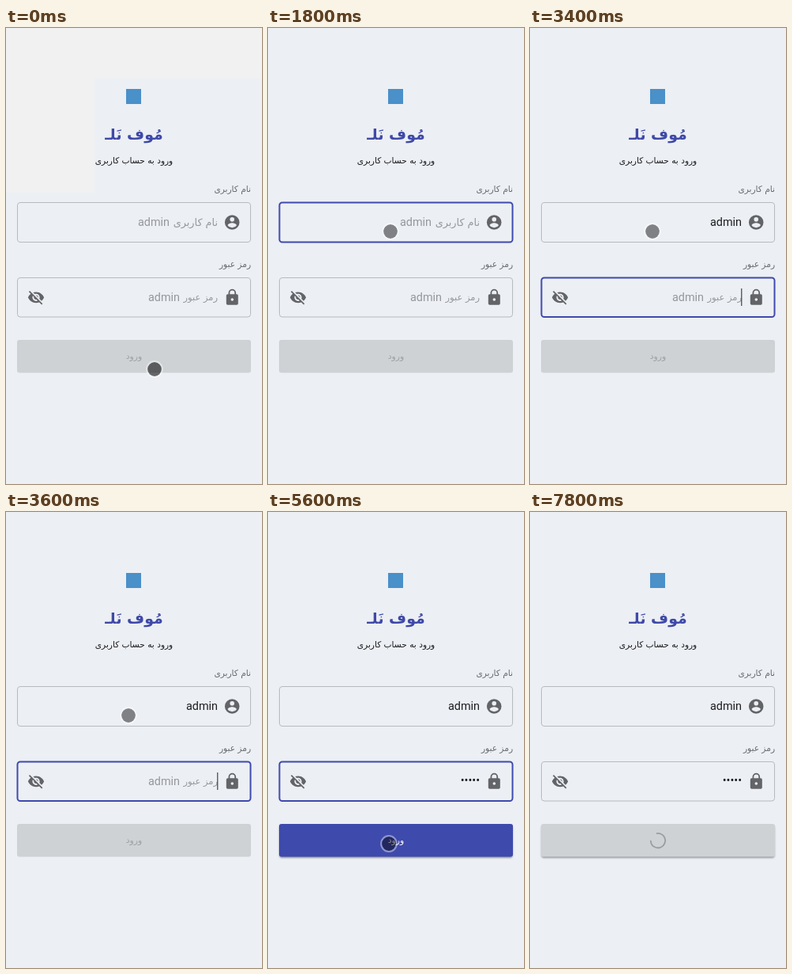
Animation, 324 px wide and 576 px high, one loop 8 s. Source, as an HTML page:

```html
<!DOCTYPE html>
<html lang="fa">
<head>
<meta charset="utf-8">
<title>ورود</title>
<style>
html, body { margin: 0; width: 100%; height: 100%; overflow: hidden; background: #eceff4; }
svg { display: block; width: 324px; height: 576px; }
text { font-family: "DejaVu Sans", sans-serif; white-space: pre; }
.fa { direction: rtl; }
.en { font: 14.4px Roboto, sans-serif; text-anchor: end; }
.mid { text-anchor: middle; }
.label { font-size: 10.6px; fill: #66686d; }
.hint { fill: #95979b; }
.value { fill: #1c1d20; }
.field { fill: none; stroke: #b7babf; }
.icon { fill: #626468; }
.hole { fill: #eceff4; }
.caret { stroke: #222; stroke-width: 1; }
</style>
</head>
<body>
<svg viewBox="0 0 324 576">
  <defs>
    <filter id="soft" x="-10%" y="-30%" width="120%" height="180%">
      <feGaussianBlur stdDeviation="1.3"/>
    </filter>
  </defs>
  <rect width="324" height="576" fill="#eceff4"/>
  <path id="veil" d="M0 0H324V64H112V208H0Z" fill="#f1f1f1"/>

  <rect x="152" y="77" width="19" height="19" fill="#4a90c9"/>
  <text class="fa mid" x="162" y="141" font-size="19" font-weight="700" fill="#3f49a8">مُوف نَلـ</text>
  <text class="fa mid" x="162" y="170.5" font-size="10.6" fill="#17181a">ورود به حساب کاربری</text>

  <text class="fa label" x="310" y="207">نام کاربری</text>
  <rect id="userBox" class="field" x="14.5" y="220.5" width="295" height="50" rx="3.5"/>
  <g id="userHint" class="hint">
    <text class="fa" x="268" y="249.5" font-size="12.8">نام کاربری</text>
    <text class="en" x="207" y="250">admin</text>
  </g>
  <text id="userText" class="en value" x="268" y="250"></text>
  <g class="icon">
    <circle cx="286.2" cy="245.5" r="9.3"/>
    <circle class="hole" cx="286.2" cy="241.8" r="2.8"/>
    <path class="hole" d="M280.6 249.2C280.6 247.3 284.3 246.3 286.2 246.3S291.8 247.3 291.8 249.2A6.8 6.8 0 0 1 280.6 249.2Z"/>
  </g>

  <text class="fa label" x="310" y="302">رمز عبور</text>
  <rect id="passBox" class="field" x="14.5" y="315.5" width="295" height="49.5" rx="3.5"/>
  <g id="passHint" class="hint">
    <text class="fa" x="268" y="344" font-size="11.5">رمز عبور</text>
    <text class="en" x="220" y="344.5">admin</text>
  </g>
  <text id="passText" class="en value" x="268" y="343.5"></text>
  <g class="icon">
    <rect x="278.8" y="336.2" width="15" height="13.6" rx="1.8"/>
    <path d="M282.4 337V334.6A3.9 3.9 0 0 1 290.2 334.6V337" fill="none" stroke="#626468" stroke-width="1.8"/>
    <circle class="hole" cx="286.3" cy="343" r="1.8"/>
    <path transform="translate(27 329.3) scale(.92)" d="M12 7c2.76 0 5 2.24 5 5 0 .65-.13 1.26-.36 1.83l2.92 2.92c1.51-1.26 2.7-2.89 3.43-4.75-1.73-4.39-6-7.5-11-7.5-1.4 0-2.74.25-3.98.7l2.16 2.16C10.74 7.13 11.35 7 12 7zM2 4.27l2.74 2.74C3.08 8.3 1.78 10.02 1 12c1.73 4.39 6 7.5 11 7.5 1.55 0 3.03-.3 4.38-.84L19.73 22 21 20.73 3.27 3zM7.53 9.8l1.55 1.55c-.05.21-.08.43-.08.65 0 1.66 1.34 3 3 3 .22 0 .44-.03.65-.08l1.55 1.55c-.67.33-1.41.53-2.2.53-2.76 0-5-2.24-5-5 0-.79.2-1.53.53-2.2zm4.31-.78l3.15 3.15.02-.16c0-1.66-1.34-3-3-3z"/>
  </g>
  <path id="caret" class="caret"/>

  <rect id="shade" x="14.5" y="396" width="295" height="41" rx="3" fill="#000" filter="url(#soft)"/>
  <rect id="button" x="14" y="394" width="296" height="41.5" rx="3"/>
  <text id="enter" class="fa mid" x="162" y="417.5" font-size="10.8">ورود</text>
  <circle id="spinner" cx="162" cy="415" r="9.2" fill="none" stroke="#9a9da0" stroke-width="1.8" pathLength="126.9"/>

  <g id="dot">
    <circle id="core" r="8.9"/>
    <circle r="9.9" fill="none" stroke="#fff" stroke-opacity=".42" stroke-width="2"/>
  </g>
</svg>
<script>
const LOOP = 8000, FOCUS_USER = 940, FOCUS_PASS = 3350, TYPE_PASS = 4400, CLICK = 5615;
const USER_KEYS = [[2600, 1], [2800, 3], [3000, 5]];
const PASS_KEYS = [[TYPE_PASS, 1], [4600, 3], [4800, 5]];
const CARET_ON = [[FOCUS_USER, 1470], [2000, 2530], [2600, FOCUS_PASS], [FOCUS_PASS, 3930], [TYPE_PASS, 5280]];
const BULLET = 4.9;

const el = id => document.getElementById(id);
const set = (id, attrs) => { for (const k in attrs) el(id).setAttribute(k, attrs[k]); };
const show = (id, on) => { el(id).style.display = on ? "" : "none"; };
const within = (t, a, b) => t >= a && t < b;
const ramp = (t, a, b) => Math.min(1, Math.max(0, (t - a) / (b - a)));
const ease = p => p * p * (3 - 2 * p);
const lerp = (a, b, p) => a + (b - a) * p;
const mix = (a, b, p) => `rgb(${a.map((v, i) => Math.round(lerp(v, b[i], p)))})`;
const typed = (keys, t) => keys.reduce((n, [at, count]) => t >= at ? count : n, 0);

function outline(id, focused) {
  el(id).style.stroke = focused ? "#3f4aad" : "";
  el(id).style.strokeWidth = focused ? 2 : 1;
}

function drawFields(t) {
  const u = typed(USER_KEYS, t), p = typed(PASS_KEYS, t);
  outline("userBox", within(t, FOCUS_USER, FOCUS_PASS));
  outline("passBox", within(t, FOCUS_PASS, CLICK));
  show("userHint", !u);
  show("passHint", !p);
  el("userText").textContent = "admin".slice(0, u);
  el("passText").textContent = "•".repeat(p);
  const inPass = t >= FOCUS_PASS;
  const x = inPass ? 267.8 - p * BULLET + (p ? 1 : 0) : 267.8;
  set("caret", { d: `M${x} ${inPass ? 329 : 234}v22` });
  show("caret", CARET_ON.some(([a, b]) => within(t, a, b)));
}

function drawButton(t) {
  const on = ramp(t, TYPE_PASS, TYPE_PASS + 250) * (1 - ramp(t, CLICK, CLICK + 250));
  set("button", { fill: mix([206, 210, 213], [63, 74, 173], on) });
  set("shade", { opacity: .37 * ramp(t, TYPE_PASS, TYPE_PASS + 250) });
  set("enter", { fill: mix([157, 160, 163], [255, 255, 255], on) });
  show("enter", t < CLICK);
  show("spinner", t >= CLICK);
  // The arc grows in the first half turn, then slides away.
  const p = Math.max(0, t - CLICK) / 1400 % 1;
  const grow = ease(ramp(p, 0, .5)), slide = ease(ramp(p, .5, 1));
  const start = 15 * grow + 110 * slide;
  const length = Math.min(lerp(1, 100, grow), 126.9 - start);
  set("spinner", {
    "stroke-dasharray": `${length} 200`,
    "stroke-dashoffset": -start,
    transform: `rotate(${360 * p} 162 415)`
  });
}

function drawDot(t) {
  const up = ease(ramp(t, 0, 850)), down = ease(ramp(t, 5150, 5560));
  const x = lerp(lerp(188, 155, up), 153, down);
  const y = lerp(lerp(431, 257, up), 419, down);
  set("dot", { transform: `translate(${x} ${y})` });
  set("core", { "fill-opacity": lerp(.57, .46, ramp(t, 0, 300)) });
  show("dot", t < TYPE_PASS || within(t, 5150, 7600));
}

function frame(now) {
  const t = now % LOOP;
  show("veil", t < 200);
  drawFields(t);
  drawButton(t);
  drawDot(t);
}

let begin;
function tick(now) {
  begin ??= now;
  frame(Math.max(0, now - begin));
  requestAnimationFrame(tick);
}
frame(0);
requestAnimationFrame(tick);
</script>
</body>
</html>
```
